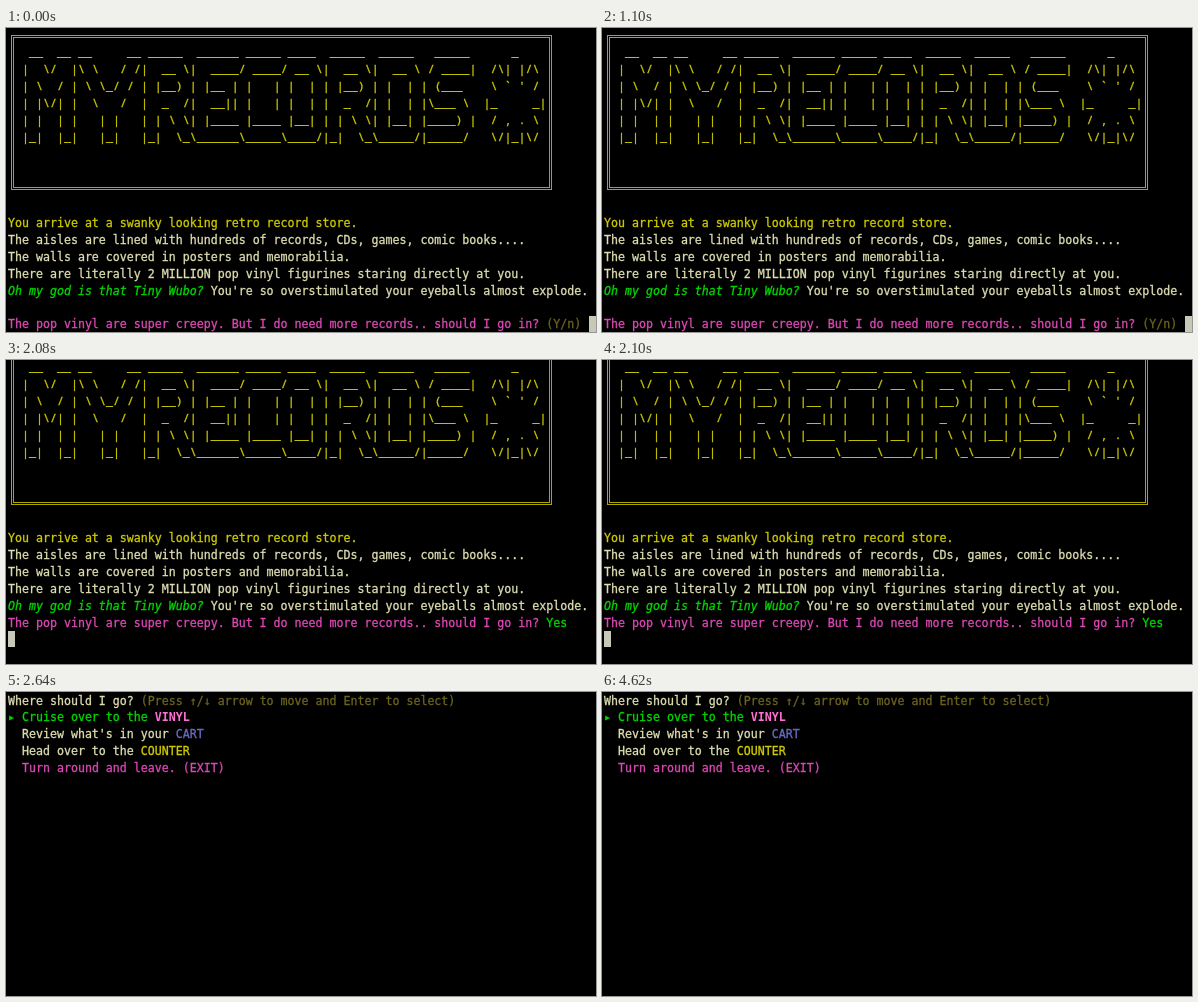
An HTML page for the animation above (4640 ms loop, 590x304 px).

```html
<!DOCTYPE html>
<html lang="en">
<head>
<meta charset="utf-8">
<title>Record store adventure</title>
<style>
html, body { margin: 0; width: 100%; height: 100%; overflow: hidden; background: #000; }
body { position: relative; --row: 16.94px; }
pre {
  position: absolute; left: 2px; top: .5px; margin: 0;
  font: 11.627px/var(--row) "DejaVu Sans Mono", monospace;
  font-variant-ligatures: none; color: #dedeb2;
  -webkit-text-stroke: .3px;
}
#store, #menu, #box, #cursor { position: absolute; }
#store, #menu { left: 0; top: 0; }
#box { left: 5px; top: 7px; width: 535px; height: 149px; border: 3px double #aaa500; }
#art { top: calc(var(--row) - 1px); font-family: "Noto Sans Mono", monospace; font-size: 11.667px; }
#story { top: calc(11 * var(--row) + .5px); }
#cursor { left: 583px; top: 288px; width: 7px; height: 16px; background: #c8c8b8; }
.yellow { color: #cfcb00; }
.green { color: #00d800; }
.pink { color: #dc48b4; }
.vinyl { color: #ff70d6; font-weight: bold; -webkit-text-stroke: 0; }
.blue { color: #6a6ac4; }
.dim { color: #6c641e; }
.yes, .answered .hint, .answered .gap { display: none; }
.answered .yes { display: inline; }
.answered #store { top: calc(-1 * var(--row)); }
.answered #cursor { left: 2px; top: 271px; }
.choosing #store, .choosing #cursor, body:not(.choosing) #menu { display: none; }
</style>
</head>
<body>
<div id="store">
<div id="box"></div>
<pre id="art" class="yellow">
   __  __ __     __ _____  ______ _____ ____  _____  _____   _____      _
  |  \/  |\ \   / /|  __ \|  ____/ ____/ __ \|  __ \|  __ \ / ____|  /\| |/\
  | \  / | \ \_/ / | |__) | |__ | |   | |  | | |__) | |  | | (___    \ ` ' /
  | |\/| |  \   /  |  _  /|  __|| |   | |  | |  _  /| |  | |\___ \  |_     _|
  | |  | |   | |   | | \ \| |____ |____ |__| | | \ \| |__| |____) |  / , . \
  |_|  |_|   |_|   |_|  \_\______\_____\____/|_|  \_\_____/|_____/   \/|_|\/</pre>
<pre id="story">
<span class="yellow">You arrive at a swanky looking retro record store.</span>
The aisles are lined with hundreds of records, CDs, games, comic books....
The walls are covered in posters and memorabilia.
There are literally 2 MILLION pop vinyl figurines staring directly at you.
<i class="green">Oh my god is that Tiny Wubo?</i> You're so overstimulated your eyeballs almost explode.
<span class="gap">
</span><span class="pink">The pop vinyl are super creepy. But I do need more records.. should I go in?</span> <span class="dim hint">(Y/n)</span><span class="green yes">Yes</span></pre>
</div>
<div id="cursor"></div>
<div id="menu">
<pre>
Where should I go? <span class="dim">(Press ↑/↓ arrow to move and Enter to select)</span>
<span class="green">▸ Cruise over to the</span> <span class="vinyl">VINYL</span>
  Review what's in your <span class="blue">CART</span>
  Head over to the <span class="yellow">COUNTER</span>
  <span class="pink">Turn around and leave. (EXIT)</span></pre>
</div>
<script>
const LOOP = 4640, ANSWER = 2080, MENU = 2120;

function render() {
  const t = performance.now() % LOOP;
  document.body.className = t < ANSWER ? "" : t < MENU ? "answered" : "choosing";
  requestAnimationFrame(render);
}
render();
</script>
</body>
</html>
```
